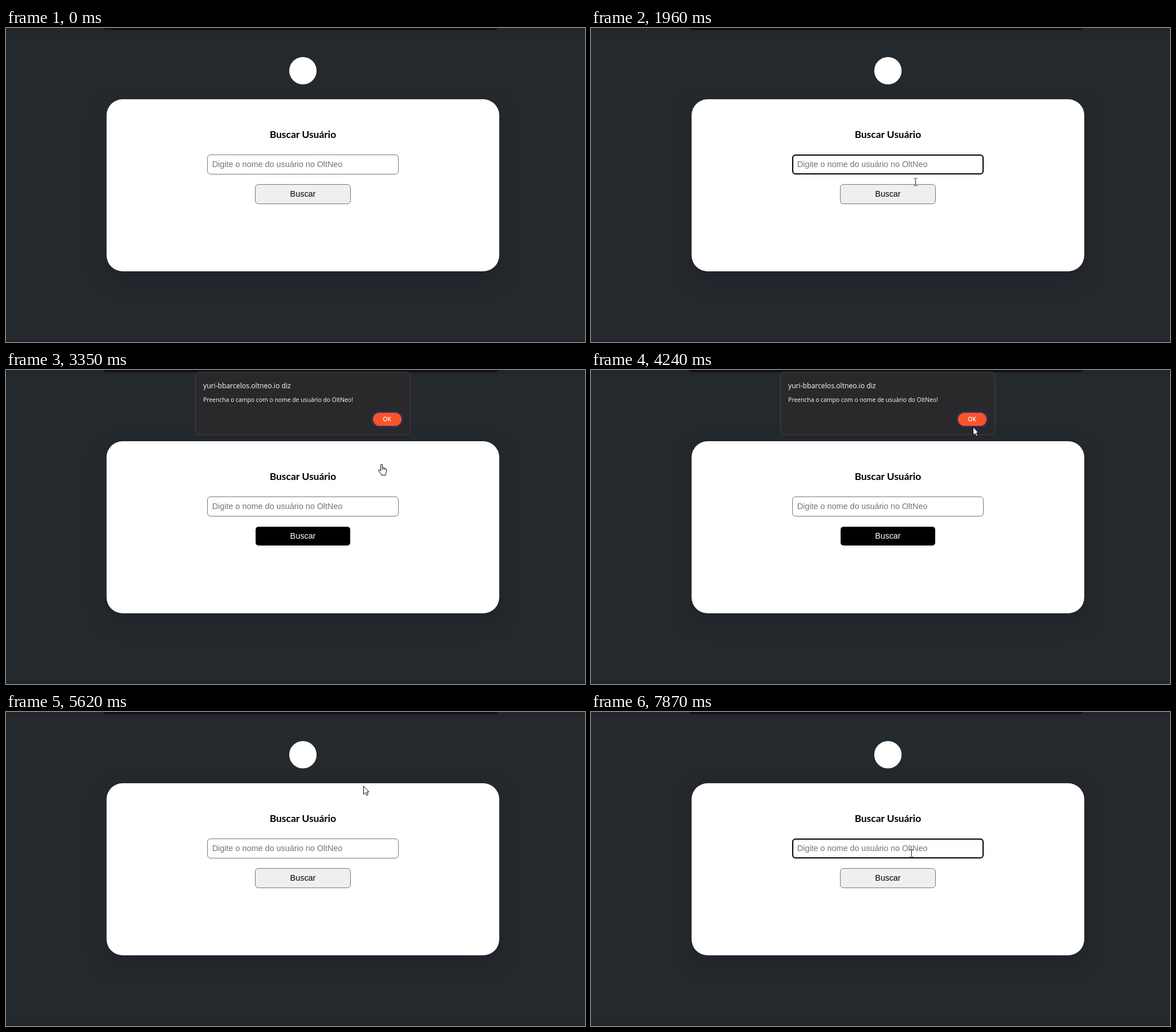
Animation, 1016 px wide and 551 px high, one loop 8 s. Source, as an HTML page:

```html
<!DOCTYPE html>
<html lang="pt-BR">
<head>
<meta charset="utf-8">
<title>Buscar Usuário</title>
<style>
html, body { margin: 0; width: 100%; height: 100%; overflow: hidden; background: #24292d; }
svg { display: block; width: 1016px; height: 551px; }
.ui { font: 14.4px "Liberation Sans", Arial, sans-serif; }
.chrome { font-family: "Open Sans", "Noto Sans", sans-serif; fill: #fff; }
.card { filter: drop-shadow(0 14px 15px rgba(30, 29, 38, .55)); }
.mid { text-anchor: middle; }

/* every timeline lasts one loop; 1% = 80 ms */
.step { animation: 8s step-end infinite; }
#focus { animation-name: focus; }
#caret { animation-name: caret; }
#hover { animation-name: hover; }
#click { animation-name: click; }
#arrow { animation-name: arrow; }
#beam { animation-name: beam; }
#hand { animation-name: hand; }
#dialog { animation: dialog 8s linear infinite; }
#pointer { animation: move 8s linear infinite; }

@keyframes focus {
  0%, 28.75% { visibility: hidden; }
  14.625%, 78.5%, 100% { visibility: visible; }
}
@keyframes caret {
  0%, 21.25%, 28.75%, 85.125%, 98.375%, 100% { visibility: hidden; }
  14.625%, 27.875%, 78.5%, 91.75% { visibility: visible; }
}
@keyframes hover {
  0%, 68.5%, 100% { visibility: hidden; }
  24.8% { visibility: visible; }
}
@keyframes click {
  0%, 15.375%, 30.375%, 66.625%, 80.125%, 100% { visibility: hidden; }
  13.75%, 28.75%, 65%, 77.625% { visibility: visible; }
}
@keyframes arrow {
  0%, 11%, 73.25%, 100% { visibility: hidden; }
  2.375%, 50.8% { visibility: visible; }
}
@keyframes beam {
  0%, 24.8% { visibility: hidden; }
  11%, 73.25%, 100% { visibility: visible; }
}
@keyframes hand {
  0%, 50.8%, 100% { visibility: hidden; }
  24.8% { visibility: visible; }
}
@keyframes dialog {
  0%, 31.125%, 68.5%, 100% { opacity: 0; transform: translateY(-18px); }
  33%, 66.625% { opacity: 1; transform: none; }
}
@keyframes move {
  0%, 2.375% { transform: translate(895px, 503px); }
  5% { transform: translate(790px, 425px); }
  7.5% { transform: translate(700px, 345px); }
  9.5% { transform: translate(630px, 265px); }
  11.75%, 22% { transform: translate(610px, 239px); }
  25.375%, 39.375% { transform: translate(555px, 281px); }
  41.875% { transform: translate(659px, 165px); }
  47%, 49.5% { transform: translate(677px, 123px); }
  55%, 67.5% { transform: translate(666px, 86px); }
  70.25% { transform: translate(627px, 129px); }
  73.5%, 75.125% { transform: translate(572px, 240px); }
  76.875%, 100% { transform: translate(562px, 248px); }
}
</style>
</head>
<body>
<svg viewBox="0 0 1016 551">
  <rect width="1016" height="551" fill="#24292d"/>
  <rect width="1016" height="8" fill="#23252a"/>
  <rect x="171" y="-10" width="693" height="13.5" rx="6" fill="#0f0e13"/>
  <rect y="546" width="1016" height="5" fill="#22252a"/>

  <circle cx="521" cy="75" r="24" fill="#fff"/>
  <rect class="card" x="176.5" y="125" width="689" height="302" rx="28" fill="#fff"/>
  <text class="mid" x="521" y="192.5" font-family="Lato, sans-serif" font-weight="700" font-size="17.5">Buscar Usuário</text>

  <g class="ui">
    <rect x="353.5" y="222.5" width="335" height="34" rx="5.5" fill="#fff" stroke="#767676"/>
    <rect id="focus" class="step" x="354" y="223" width="334" height="33" rx="5" fill="none" stroke="#000" stroke-width="2"/>
    <text x="361.7" y="244" fill="#757575">Digite o nome do usuário no OltNeo</text>
    <rect id="caret" class="step" x="362" y="232" width="1" height="16"/>

    <rect x="437.5" y="274.5" width="167" height="34" rx="5.5" fill="#efefef" stroke="#767676"/>
    <text class="mid" x="521" y="296">Buscar</text>
    <g id="hover" class="step">
      <rect x="436" y="273" width="170" height="37" fill="#fff"/>
      <rect x="438" y="275" width="166" height="33" rx="5"/>
      <text class="mid" x="521" y="296" fill="#fff">Buscar</text>
    </g>
  </g>

  <g id="dialog" class="chrome">
    <rect x="332.5" y="3.5" width="377" height="110" rx="7" fill="#29292c" stroke="#404044"/>
    <text x="346" y="32" font-size="12.2">yuri-bbarcelos.oltneo.io diz</text>
    <text x="346" y="55.5" font-size="10.4">Preencha o campo com o nome de usuário do OltNeo!</text>
    <rect x="642.5" y="73.5" width="53" height="26" rx="13" fill="#29292c" stroke="#322d66" stroke-width="2.5"/>
    <rect x="644" y="75" width="50" height="23" rx="11.5" fill="#fb542b"/>
    <text class="mid" x="668.5" y="90" font-size="10" font-weight="600">OK</text>
  </g>

  <g id="pointer">
    <circle id="click" class="step" cx="-1" cy="-1" r="10" fill="#fffb28" fill-opacity=".65"/>
    <path id="arrow" class="step" d="M.5 .5V15L3.8 11.9 6.1 17 8.4 16 6.2 11H10.2Z" fill="#fff" stroke="#000"/>
    <path id="beam" class="step" d="M-3-6.5H-.5L.5-5.5 1.5-6.5H4M.5-5.5V5.5M-3 6.5H-.5L.5 5.5 1.5 6.5H4" fill="none" stroke="#222"/>
    <g id="hand" class="step">
      <path d="M-1.5 12V2Q-1.5.5 0 .5T1.5 2V7Q3 5.6 4 7.2 5.6 6.2 6.3 8 8.5 7.6 8.5 9.7V13.5Q8.5 16 7 17.5V19.5H-.5V18Q-3.2 15.2-5 11.8-5.4 9.8-3.6 10Z" fill="#fff" stroke="#000"/>
      <path d="M1.5 7V10.5M4 7.2V10.5M6.3 8V10.5" fill="none" stroke="#000" stroke-width=".8"/>
    </g>
  </g>
</svg>
</body>
</html>
```
